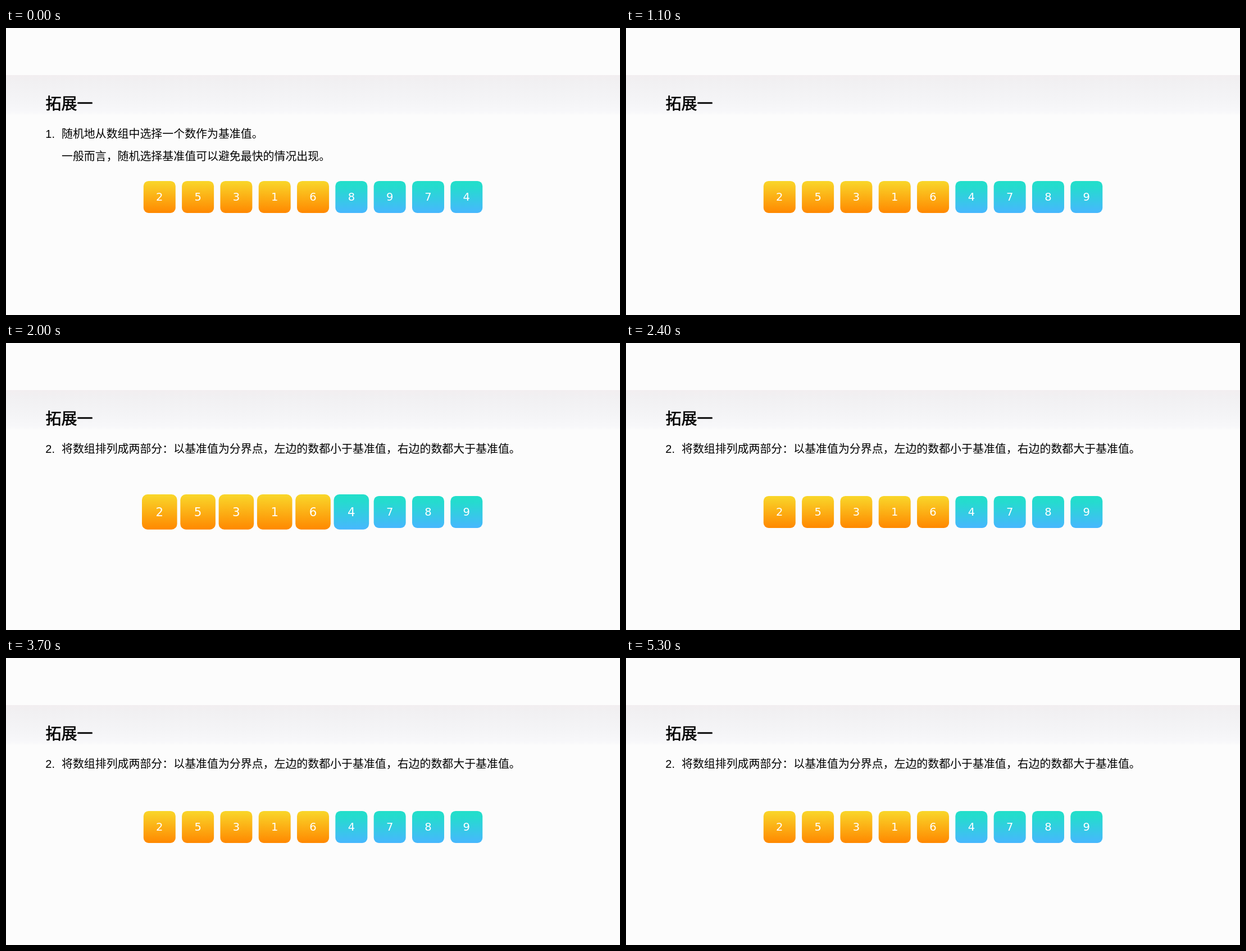
Write an HTML page that moves like this. It is 1093 px wide and 512 px high and loops after 5.4 s.

```html
<!DOCTYPE html>
<html lang="zh-CN">
<head>
<meta charset="utf-8">
<title>拓展一</title>
<style>
  html, body { margin: 0; width: 100%; height: 100%; overflow: hidden; background: #fcfcfc; }
  svg { display: block; width: 1093px; height: 512px; }
  text { font-family: "Noto Sans CJK SC", "Noto Sans CJK", sans-serif; font-size: 19.93px; fill: #000; }
  .title { font-size: 28px; stroke: #000; stroke-width: .65px; }
  .number { font-family: "Liberation Sans", Arial, sans-serif; font-size: 20px; }
  .digit { font-family: "DejaVu Sans", sans-serif; font-size: 19.5px; fill: #fff; text-anchor: middle; }
</style>
</head>
<body>
<svg viewBox="0 0 1093 512" lang="zh-CN">
  <defs>
    <linearGradient id="band" x2="0" y2="1">
      <stop offset="0" stop-color="#f2eef0"/>
      <stop offset=".16" stop-color="#f1f0f2"/>
      <stop offset=".6" stop-color="#f4f4f6"/>
      <stop offset=".92" stop-color="#f8f8fa"/>
      <stop offset="1" stop-color="#fcfcfc"/>
    </linearGradient>
    <linearGradient id="gold" x2="0" y2="1">
      <stop offset="0" stop-color="#f9d72a"/>
      <stop offset="1" stop-color="#ff8800"/>
    </linearGradient>
    <linearGradient id="teal" x2="0" y2="1">
      <stop offset="0" stop-color="#22dfca"/>
      <stop offset=".2" stop-color="#25dbcf"/>
      <stop offset="1" stop-color="#47b7fe"/>
    </linearGradient>
  </defs>
  <rect y="84" width="1093" height="72" fill="url(#band)"/>
  <text class="title" x="70.5" y="144.5">拓展一</text>
  <g id="intro">
    <text class="number" x="70.3" y="196">1.</text>
    <text x="99" y="196">随机地从数组中选择一个数作为基准值。</text>
    <text x="99" y="236">一般而言，随机选择基准值可以避免最快的情况出现。</text>
  </g>
  <g id="split">
    <text class="number" x="70.3" y="196">2.</text>
    <text x="99" y="196">将数组排列成两部分：以基准值为分界点，左边的数都小于基准值，右边的数都大于基准值。</text>
  </g>
  <g id="tiles"></g>
</svg>
<script>
const LOOP = 5400, PITCH = 68.31, FIRST_X = 273.3, MID_Y = 301.4, SIZE = 57;
const SVG_NS = 'http://www.w3.org/2000/svg';

// [digit, start slot, end slot], listed from back to front
const tiles = [
  [2, 0, 0], [5, 1, 1], [3, 2, 2], [1, 3, 3], [6, 4, 4],
  [4, 8, 5], [9, 6, 8], [8, 5, 7], [7, 7, 6]
].map(([digit, from, to]) => ({ from, to, node: makeTile(digit, to < 5 ? 'gold' : 'teal') }));

const intro = document.getElementById('intro');
const split = document.getElementById('split');

function add(parent, name, attrs) {
  const node = document.createElementNS(SVG_NS, name);
  for (const key in attrs) node.setAttribute(key, attrs[key]);
  return parent.appendChild(node);
}

function makeTile(digit, paint) {
  const group = add(document.getElementById('tiles'), 'g', {});
  add(group, 'rect', {
    x: -SIZE / 2, y: -SIZE / 2, width: SIZE, height: SIZE, rx: 9, fill: `url(#${paint})`
  });
  add(group, 'text', { class: 'digit', y: 7 }).textContent = digit;
  return group;
}

const progress = (t, start, end) => Math.min(1, Math.max(0, (t - start) / (end - start)));
const ease = p => p * p * (3 - 2 * p);
const pulse = (t, start) => 1 + 0.103 * Math.sin(Math.PI * progress(t, start, start + 500));

function draw(t) {
  intro.setAttribute('opacity', 1 - progress(t, 300, 600));
  split.setAttribute('opacity', progress(t, 1300, 1700));
  const move = ease(progress(t, 480, 1020));
  for (const { from, to, node } of tiles) {
    const x = FIRST_X + PITCH * (from + (to - from) * move);
    const scale = pulse(t, to < 6 ? 1800 : 4600);
    node.setAttribute('transform', `translate(${x} ${MID_Y}) scale(${scale})`);
  }
}

function tick() {
  draw(performance.now() % LOOP);
  requestAnimationFrame(tick);
}
tick();
</script>
</body>
</html>
```
